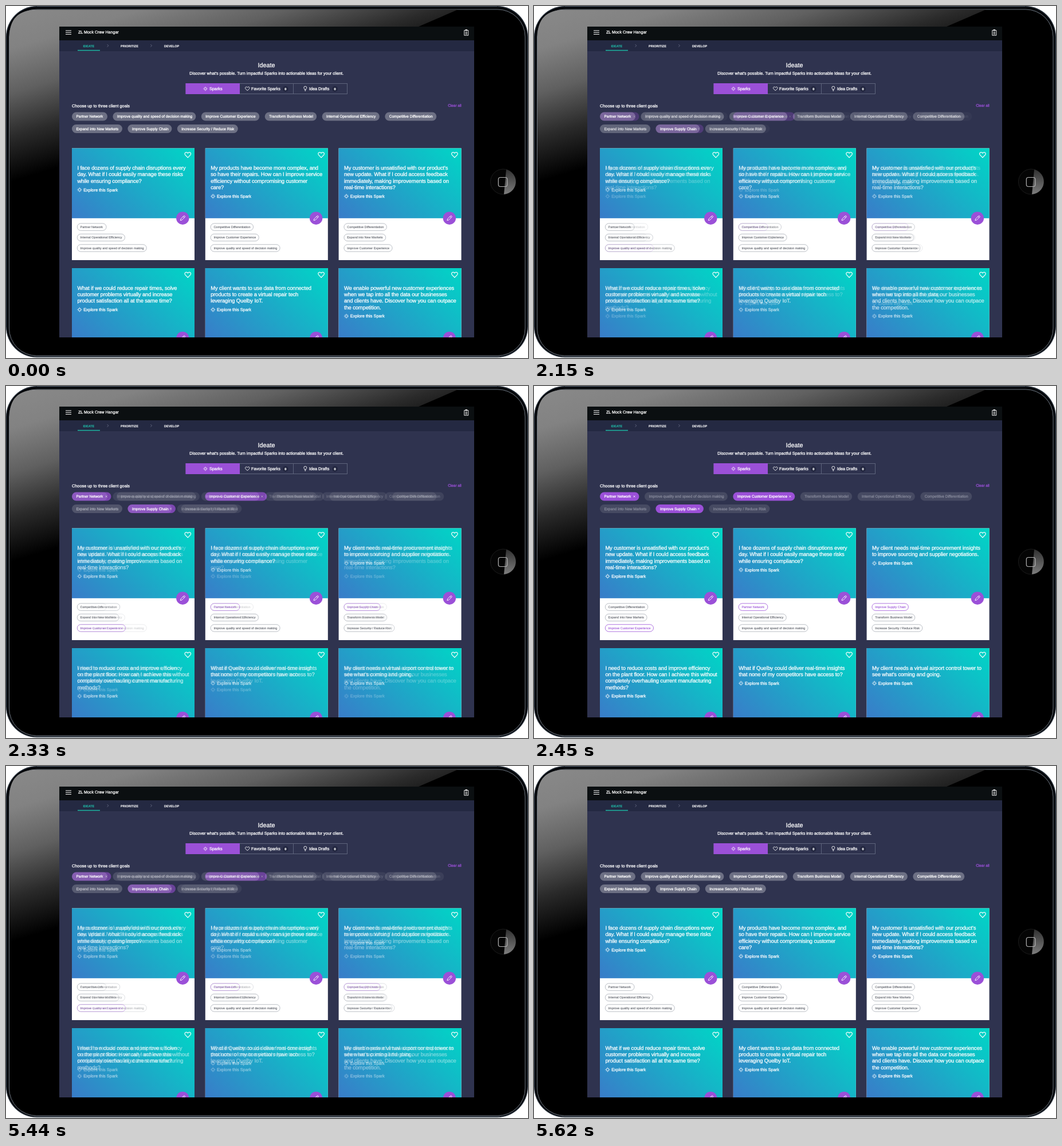
Write an HTML page that moves like this. It is 911x615 px and loops after 6020 ms.

```html
<!DOCTYPE html>
<html lang="en">
<head>
<meta charset="utf-8">
<title>Ideate board</title>
<style>
html, body { margin: 0; width: 100%; height: 100%; overflow: hidden; background: #fff; }
svg { display: block; width: 911px; height: 615px; }
text { font-family: "Liberation Sans", Arial, sans-serif; text-rendering: geometricPrecision; white-space: pre; }
</style>
</head>
<body>
<svg id="stage" viewBox="0 0 911 615"></svg>
<script>
const PURPLE = '#9b50d8', TEAL = '#20b8a6', BG = '#2f334f';

// Goal labels with their pill widths
const GOALS = {
  partner: ['Partner Network', 62],
  quality: ['Improve quality and speed of decision making', 145],
  experience: ['Improve Customer Experience', 101.5],
  transform: ['Transform Business Model', 90.5],
  internal: ['Internal Operational Efficiency', 100.3],
  differ: ['Competitive Differentiation', 90],
  expand: ['Expand into New Markets', 88],
  supply: ['Improve Supply Chain', 77],
  security: ['Increase Security / Reduce Risk', 106]
};
const GOAL_ROWS = [
  ['partner', 'quality', 'experience', 'transform', 'internal', 'differ'],
  ['expand', 'supply', 'security']
];

const SUPPLY = 'I face dozens of supply chain disruptions every|day. What if I could easily manage these risks|while ensuring compliance?';
const UPDATE = "My customer is unsatisfied with our product's|new update. What if I could access feedback|immediately, making improvements based on|real-time interactions?";

const UNFILTERED = {
  selected: [],
  cards: [
    [SUPPLY, 'partner', 'internal', 'quality'],
    ['My products have become more complex, and|so have their repairs. How can I improve service|efficiency without compromising customer|care?', 'differ', 'experience', 'quality'],
    [UPDATE, 'differ', 'expand', 'experience'],
    ['What if we could reduce repair times, solve|customer problems virtually and increase|product satisfaction all at the same time?'],
    ['My client wants to use data from connected|products to create a virtual repair tech|leveraging Quelby IoT.'],
    ['We enable powerful new customer experiences|when we tap into all the data our businesses|and clients have. Discover how you can outpace|the competition.']
  ]
};
const FILTERED = {
  selected: ['partner', 'experience', 'supply'],
  cards: [
    [UPDATE, 'differ', 'expand', 'experience'],
    [SUPPLY, 'partner', 'internal', 'quality'],
    ['My client needs real-time procurement insights|to improve sourcing and supplier negotiations.', 'supply', 'transform', 'security'],
    ['I need to reduce costs and improve efficiency|on the plant floor. How can I achieve this without|completely overhauling current manufacturing|methods?'],
    ['What if Quelby could deliver real-time insights|that none of my competitors have access to?'],
    ["My client needs a virtual airport control tower to|see what's coming and going."]
  ]
};

// Text is placed by the vertical centre of its capitals
const text = (x, y, size, label, fill = '#fff', more = '') =>
  `<text x="${x}" y="${y + size * 0.35}" font-size="${size}" fill="${fill}" stroke="${fill}" stroke-width=".28" ${more}>${label}</text>`;
const rect = (x, y, w, h, fill, more = '') =>
  `<rect x="${x}" y="${y}" width="${w}" height="${h}" fill="${fill}" ${more}/>`;
const line = (d, stroke = '#fff', width = 1, more = '') =>
  `<path d="${d}" fill="none" stroke="${stroke}" stroke-width="${width}" ${more}/>`;
const at = (x, y, body, scale = 1) => `<g transform="translate(${x} ${y}) scale(${scale})">${body}</g>`;

const heart = line('M0 4.6L-4.6 -.1C-6.3 -2.2 -4.7 -4.6 -2.7 -4.6C-1.4 -4.6 -.5 -3.9 0 -2.9C.5 -3.9 1.4 -4.6 2.7 -4.6C4.7 -4.6 6.3 -2.2 4.6 -.1Z', '#fff', 1.2, 'stroke-linejoin="round"');
const pencil = line('M-4 4L-3.3 1.3L2 -4Q2.8 -4.6 3.6 -3.8L3.9 -3.5Q4.6 -2.8 4 -2L-1.3 3.3ZM.9 -2.9L2.9 -.9', '#fff', 0.9, 'stroke-linejoin="round"');
const spark = '<circle r="2.1" fill="none" stroke="#fff" stroke-width=".8"/>' +
  line('M0 -4.1V-2.4M0 2.4V4.1M-4.1 0H-2.4M2.4 0H4.1M-2.6 -2.6L-1.8 -1.8M1.8 1.8L2.6 2.6M-2.6 2.6L-1.8 1.8M1.8 -1.8L2.6 -2.6', '#fff', 0.8);
const bulb = line('M-1.3 1.4C-1.3 .2 -2.5 -.1 -2.5 -1.6A2.5 2.5 0 0 1 2.5 -1.6C2.5 -.1 1.3 .2 1.3 1.4ZM-1.2 2.6H1.2M-.7 3.8H.7', '#fff', 0.9);
const chevron = line('M-1.2 -2.2L1 0L-1.2 2.2', '#7d839b', 0.7);

function pills(selected) {
  return GOAL_ROWS.map((row, r) => {
    let x = 115;
    const y = 193 + r * 21.5;
    return row.map(key => {
      const [label, base] = GOALS[key];
      const on = selected.includes(key), dim = selected.length && !on;
      const w = base + (on ? 6.5 : 0), left = x;
      x += w + 9.4;
      return rect(left, y - 7.5, w, 15, on ? PURPLE : dim ? '#464a62' : '#6d7084', 'rx="7.5"') +
        text(left + 7.5, y, 6.48, label, dim ? '#85889a' : '#fff') +
        (on ? line(`M${left + w - 10} ${y - 1.5}l3 3m0 -3l-3 3`, '#fff', 0.7) : '');
    }).join('');
  }).join('');
}

function chip(key, y, on) {
  const [label, base] = GOALS[key];
  return rect(9.3, y - 6.2, (base - 15) * 0.846 + 11, 12.4, '#fff', `rx="6.2" stroke="${on ? PURPLE : '#a9aeb6'}" stroke-width=".8"`) +
    text(14.6, y, 5.48, label, on ? PURPLE : '#565a62', 'stroke-opacity=".3"');
}

function card([copy, ...goals], i, selected) {
  const lines = copy.split('|');
  const exploreY = 50 + 11.3 * (lines.length - 1);
  return at(115 + (i % 3) * 232.8, i < 3 ? 248.5 : 458,
    rect(0, 0, 214, 195.5, '#fff') + rect(0, 0, 214, 122.3, 'url(#sea)') +
    at(202.3, 11.7, heart) +
    lines.map((s, n) => text(9.4, 34.4 + n * 11.3, 9.4, s, '#fff', 'letter-spacing="-.11"')).join('') +
    at(13.4, exploreY, spark) + text(20.2, exploreY, 7.4, 'Explore this Spark') +
    `<circle cx="193.3" cy="122.2" r="11.2" fill="${PURPLE}"/>` + at(193.3, 122.2, pencil) +
    goals.map((g, n) => chip(g, 137.6 + n * 18.4, selected.includes(g))).join(''));
}

const board = ({ selected, cards }) =>
  rect(93, 180, 724, 399, BG) + pills(selected) + cards.map((c, i) => card(c, i, selected)).join('');

const device =
  rect(0, 0, 911, 614, '#27303b', 'rx="54"') +
  rect(1.5, 1.5, 908, 611, '#05070a', 'rx="52"') +
  rect(5.5, 6, 900.5, 605, '#000', 'rx="48" stroke="#6e7680" stroke-width="1"') +
  '<path d="M54 6.5H788L720 36L93 330L6 374V54Q6 6.5 54 6.5Z" fill="url(#glare)"/>' +
  line('M54 .6H857M48 612.5H862', '#59616b', 0.8) +
  '<circle cx="867.5" cy="307" r="22" fill="#050505" stroke="#1c1c1c"/>' +
  '<path d="M873 285.7A22 22 0 0 1 869 329Z" fill="url(#button)"/>' +
  rect(859.3, 299.5, 15.5, 16, 'none', 'rx="3.5" stroke="#b4b4b4" stroke-width="1.2"');

const tab = (x, label, icon) => icon + text(x, 144.6, 7.25, label);
const badge = x => `<circle cx="${x}" cy="145" r="5" fill="#232740"/>` +
  text(x, 145, 5.6, '0', '#fff', 'text-anchor="middle" font-weight="bold"');

const header =
  rect(93, 36, 724, 543, BG) + rect(93, 36, 724, 24, '#0b0f11') + rect(93, 60, 724, 19, '#242942') +
  line('M104 43H114M104 46.2H114M104 49.4H114') +
  text(126, 45.7, 7.1, 'ZL Mock Crew Hangar') +
  line('M799.8 42.5H806.8V51.3H799.8ZM801.6 45.4H805M801.6 47.3H805M801.6 49.2H805', '#fff', 0.9) +
  rect(801.6, 41, 3.4, 2.2, '#fff') +
  ['IDEATE', 'PRIORITIZE', 'DEVELOP'].map((s, i) =>
    text([134.5, 200, 276][i], 69.6, 5.5, s, i ? '#fff' : TEAL, 'font-weight="bold" stroke-opacity=".4"')).join('') +
  at(177.8, 69.3, chevron) + at(253.5, 69.3, chevron) + rect(125, 76.8, 39, 1.5, TEAL) +
  text(454.6, 102.8, 10.8, 'Ideate', '#fff', 'text-anchor="middle"') +
  text(454.7, 117.4, 7.24, "Discover what's possible. Turn impactful Sparks into actionable Ideas for your client.", '#fff', 'text-anchor="middle"') +
  rect(314, 135.5, 281.5, 18, 'none', 'stroke="#646982" stroke-width=".9"') +
  line('M501.5 135.5V153.5', '#646982', 0.9) + rect(313.5, 135, 94.5, 19, PURPLE) +
  tab(355, 'Sparks', at(348, 144.6, spark, 0.9)) +
  tab(428, 'Favorite Sparks', at(421.3, 144.6, heart, 0.72)) + badge(487.7) +
  tab(529, 'Idea Drafts', at(522.3, 144.4, bulb)) + badge(574) +
  text(115, 174.6, 7.33, 'Choose up to three client goals') +
  text(771.2, 174, 6.45, 'Clear all', PURPLE);

const gradient = (id, coords, ...colors) =>
  `<linearGradient id="${id}" gradientUnits="userSpaceOnUse" ${coords}>` +
  colors.map((c, i) => `<stop offset="${i / (colors.length - 1)}" stop-color="${c}"/>`).join('') + '</linearGradient>';

document.getElementById('stage').innerHTML =
  '<defs><clipPath id="screen"><path d="M93 36H817V579H93Z"/></clipPath>' +
  gradient('sea', 'x1="23" y1="145" x2="191" y2="-23"', '#397cc9', '#00d6c6') +
  gradient('glare', 'x1="0" y1="0" x2="85" y2="284"', '#8a8a8a', '#828282', '#606060', '#2a2a2a', '#000') +
  gradient('button', 'x1="876" y1="286" x2="872" y2="330"', '#333', '#808080') + '</defs>' +
  device + `<g clip-path="url(#screen)">${header}${board(UNFILTERED)}<g id="filtered">${board(FILTERED)}</g></g>`;

const filtered = document.getElementById('filtered');
const LOOP = 6020, STEP = 30;
const fade = (t, start, steps) =>
  Math.max(0, Math.min(1, (Math.floor((t - start) / STEP) + 1) / steps));

function draw() {
  const t = performance.now() % LOOP;
  filtered.setAttribute('opacity', fade(t, 2060, 14) - fade(t, 5320, 11));
  requestAnimationFrame(draw);
}
draw();
</script>
</body>
</html>
```
